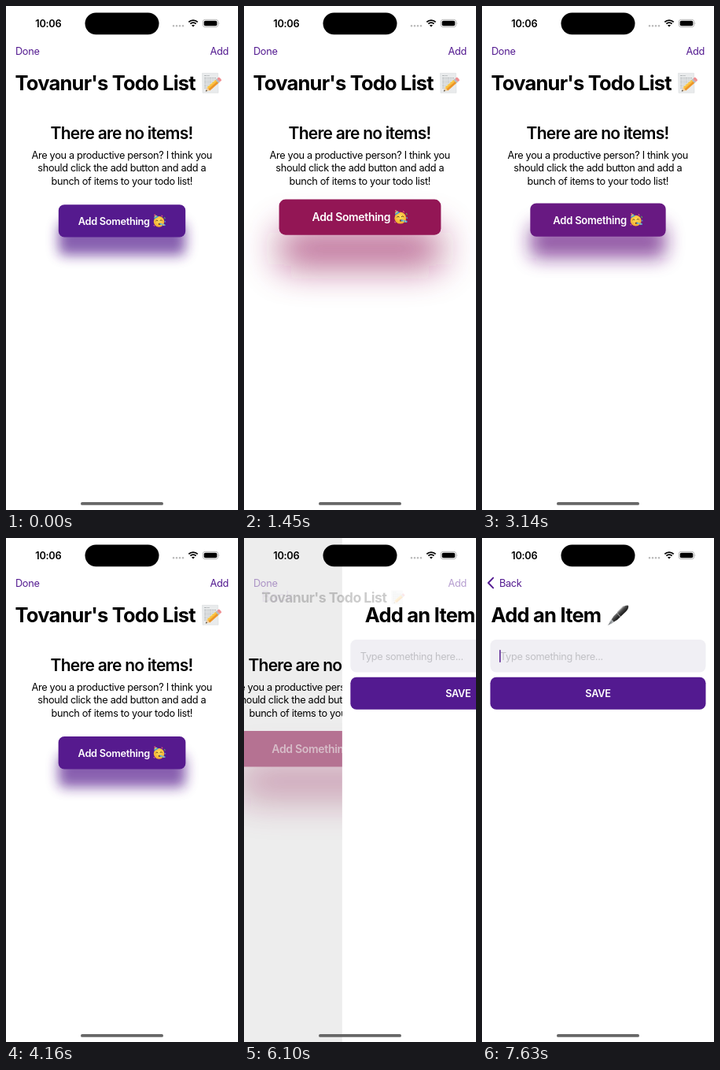
These frames come from a looping animation (295x640 px, 8 s). An HTML page:

```html
<!DOCTYPE html>
<html lang="en">
<head>
<meta charset="utf-8">
<title>Todo list</title>
<style>
  html, body { margin: 0; width: 100%; height: 100%; overflow: hidden; background: #fff; }
  svg { display: block; width: 100%; height: 100%; }
  text { font: 400 12.75px Inter, "Open Sans", sans-serif; letter-spacing: -.026em; white-space: pre; }
  .large { font-size: 25.5px; font-weight: 700; letter-spacing: -.031em; }
  .heading { font-size: 21px; font-weight: 600; letter-spacing: -.037em; }
  .strong { font-weight: 600; letter-spacing: -.022em; }
  .mid { text-anchor: middle; }
  .tint { fill: #531a90; }
</style>
</head>
<body>
<svg viewBox="0 0 295 640" xmlns="http://www.w3.org/2000/svg">
  <defs>
    <filter id="blur" filterUnits="userSpaceOnUse" x="-220" y="-120" width="440" height="320">
      <feGaussianBlur id="blurAmount" stdDeviation="7.5"/>
    </filter>
    <linearGradient id="pencilBody" x1="0" y1="0" x2="0" y2="1">
      <stop offset="0" stop-color="#ffd34d"/>
      <stop offset="1" stop-color="#ee8f22"/>
    </linearGradient>
    <radialGradient id="skin" cx=".5" cy=".4" r=".65">
      <stop offset="0" stop-color="#ffe25a"/>
      <stop offset="1" stop-color="#f2a42c"/>
    </radialGradient>
    <linearGradient id="penBody" x1="0" y1="0" x2="0" y2="1">
      <stop offset="0" stop-color="#777"/>
      <stop offset=".45" stop-color="#3d3d3d"/>
      <stop offset="1" stop-color="#161616"/>
    </linearGradient>

    <!-- memo: sheet with writing and a pencil -->
    <g id="memo">
      <path d="M1.5 .8H21.5L22 25.8H2Z" fill="#e9ebec" stroke="#d3d6d8" stroke-width=".5"/>
      <g stroke="#a3a7aa" stroke-width=".8" stroke-dasharray="3.2 .7 1.8 .6">
        <path d="M4 4H11M4 7H19M4 9.5H18M4 12H16M4 14.5H14M4 17H12M4 19.5H10"/>
      </g>
      <g transform="translate(5.8 24) rotate(-41)">
        <path d="M0 0L5-2.7V2.7Z" fill="#f2cfa0"/>
        <path d="M0 0L2-1.1V1.1Z" fill="#444"/>
        <rect x="4.8" y="-2.8" width="14.7" height="5.6" fill="url(#pencilBody)"/>
        <path d="M5 1H19.5" stroke="#d9791b" stroke-width=".6"/>
        <rect x="19.2" y="-2.9" width="2.5" height="5.8" fill="#b8bdc1"/>
        <rect x="21.5" y="-2.8" width="3.6" height="5.6" rx="1.6" fill="#ee8e91"/>
      </g>
    </g>

    <!-- party face, centred on its own origin -->
    <g id="party">
      <circle cx="-.6" cy="1" r="6.8" fill="url(#skin)"/>
      <path d="M-6.9-2.2L-5.7-7.8L-1-5.3Z" fill="#3e9bdc"/>
      <path d="M-6.6-4.5L-3.6-6.7" stroke="#f4d548" stroke-width="1.1"/>
      <circle cx="-5.9" cy="-7.3" r="1" fill="#ef5a72"/>
      <g fill="none" stroke="#60401a" stroke-width=".9" stroke-linecap="round">
        <path d="M-4.5-.1Q-3.3-1.7-2-.2M.7-.5Q2-2 3.2-.5"/>
      </g>
      <path d="M-1.4 3.2Q1 2.4 1.8 3.9Q1 5.5-1 5.2Z" fill="#7b3b1c"/>
      <path d="M1 3.9L6.6 5.3" stroke="#4aa4e3" stroke-width="1.9" stroke-linecap="round"/>
      <path d="M2.6 4.3L3.4 4.5M5 4.9L5.8 5.1" stroke="#f5dc5c" stroke-width="1.9"/>
      <g stroke-width="1.1" stroke-linecap="round">
        <path d="M2.8-6.8L3.7-5.9" stroke="#eb5777"/>
        <path d="M6.3-4.2L7-3" stroke="#55b85b"/>
        <path d="M6.8 .5L7.5 1.2" stroke="#4a9fe0"/>
        <path d="M-7.2 5.6L-6.5 6.3" stroke="#e05a9b"/>
      </g>
    </g>

    <!-- fountain pen -->
    <g id="pen" transform="translate(1 26) rotate(-44)">
      <path d="M0 0Q4-2.4 8.5-2.3V2.3Q4 2.4 0 0Z" fill="#a9adb0"/>
      <path d="M0 0H6" stroke="#55585a" stroke-width=".6"/>
      <path d="M8-2.2L13-3.3H29Q34-2.9 35.5 0Q34 2.9 29 3.3H13L8 2.2Z" fill="url(#penBody)"/>
      <path d="M18.5-3.3V3.3" stroke="#aaa" stroke-width="1"/>
      <path d="M20-3.4H31" stroke="#999" stroke-width="1.1"/>
    </g>
  </defs>

  <rect width="295" height="640" fill="#fff"/>

  <g id="list">
    <text class="heading mid" x="147" y="169">There are no items!</text>
    <text class="mid" x="147.3" y="193.7">Are you a productive person? I think you</text>
    <text class="mid" x="147.3" y="210.3">should click the add button and add a</text>
    <text class="mid" x="147.3" y="226.9">bunch of items to your todo list!</text>
    <g id="button">
      <rect id="glow" height="41.3" rx="7.5" opacity=".7" filter="url(#blur)"/>
      <rect id="face" y="-20.65" height="41.3" rx="7.5"/>
      <g id="label">
        <text class="strong" x="-55.7" y="4.8" fill="#fff">Add Something</text>
        <use href="#party" x="47.5"/>
      </g>
    </g>
  </g>
  <rect id="dim" width="295" height="640" fill="#000" opacity="0"/>

  <g id="page">
    <rect width="295" height="640" fill="#fff"/>
    <rect x="10.5" y="129" width="274" height="41.5" rx="7.5" fill="#f0eff4"/>
    <text x="23" y="154.8" fill="#c0c0c5">Type something here...</text>
    <rect id="caret" x="22.2" y="142" width="1.5" height="16" rx=".7" class="tint"/>
    <rect x="10.5" y="176.7" width="274" height="41" rx="7.5" class="tint"/>
    <text class="strong mid" x="147.5" y="201.8" fill="#fff">SAVE</text>
  </g>

  <g id="listBar">
    <text class="tint" x="12" y="61.8">Done</text>
    <text class="tint" x="283" y="61.8" text-anchor="end">Add</text>
  </g>
  <g id="listTitle">
    <text class="large" x="-.4" y="9">Tovanur's Todo List</text>
    <use href="#memo" x="236" y="-13.5"/>
  </g>
  <g id="pageTitle">
    <text class="large" x="11.6" y="107">Add an Item</text>
    <use href="#pen" x="159.5" y="84.5"/>
  </g>
  <text id="back" class="tint" x="0" y="4.6">Back</text>
  <path id="chevron" d="M14.2 50.6L8 57L14.2 63.4" fill="none" stroke="#531a90" stroke-width="1.9" stroke-linecap="round" stroke-linejoin="round"/>

  <!-- status bar and home indicator -->
  <text class="strong mid" x="53.8" y="26.7">10:06</text>
  <rect x="100.5" y="8.4" width="94" height="27.8" rx="13.9"/>
  <path d="M213 25.3H226" stroke="#b9b9b9" stroke-width="2.6" stroke-linecap="round" stroke-dasharray="0 4"/>
  <g fill="none" stroke="#000" stroke-width="1.8">
    <path d="M232.3 20.4A8.1 8.1 0 0 1 243.7 20.4M234.4 22.7A5.1 5.1 0 0 1 241.6 22.7"/>
  </g>
  <path d="M238 26.6L236 24.5Q238 22.9 240 24.5Z"/>
  <rect x="250.3" y="17.3" width="19.4" height="9.4" rx="2.9" fill="none" stroke="#a5a5a5" stroke-width=".8"/>
  <rect x="251.7" y="18.7" width="16.6" height="6.6" rx="1.8"/>
  <path d="M270.7 20.5Q272.2 22 270.7 23.5Z" fill="#a5a5a5"/>
  <rect x="95" y="630" width="105" height="3.8" rx="1.9" fill="#666"/>
</svg>
<script>
const LOOP = 8000, HALF = 2065, PULSE_START = -255;
const PUSH = 5985, PRESS = 5980, CARET = 7490;
const COOL = [82, 26, 144], WARM = [150, 22, 80];

const el = Object.fromEntries([...document.querySelectorAll('[id]')].map(n => [n.id, n]));
const clamp = v => Math.min(1, Math.max(0, v));
const lerp = (a, b, k) => a + (b - a) * k;

function set(node, attrs) {
  for (const key in attrs) node.setAttribute(key, attrs[key]);
}

// cubic-bezier(.42, 0, .58, 1)
function easeInOut(x) {
  let lo = 0, hi = 1;
  for (let i = 0; i < 24; i++) {
    const s = (lo + hi) / 2, r = 1 - s;
    const bx = 3 * r * r * s * .42 + 3 * r * s * s * .58 + s * s * s;
    if (bx < x) lo = s; else hi = s;
  }
  return lo * lo * (3 - 2 * lo);
}

// critically damped spring
function spring(ms) {
  const u = Math.max(0, ms) * .0167;
  return u > 12 ? 1 : 1 - Math.exp(-u) * (1 + u);
}

function mix(k) {
  const part = COOL.map((c, i) => Math.round(Math.sqrt(lerp(c * c, WARM[i] * WARM[i], k))));
  return `rgb(${part})`;
}

function drawButton(t) {
  const phase = ((t - PULSE_START) / HALF) % 2;
  const k = easeInOut(phase < 1 ? phase : 2 - phase);
  const width = lerp(160, 190, k), fill = mix(k), pressed = t >= PRESS;
  set(el.button, {
    transform: `translate(147.5 ${273 - 5.25 * k}) scale(${1 + .1 * k})`,
    opacity: pressed ? .56 : 1
  });
  set(el.face, { x: -width / 2, width, fill });
  set(el.glow, { x: -width / 2, y: -20.65 + lerp(22.5, 37.5, k), width, fill });
  set(el.blurAmount, { stdDeviation: lerp(7.5, 22.5, k) });
  set(el.label, { opacity: pressed ? .6 : 1 });
}

function drawPush(t) {
  const p = spring(t - PUSH), rest = 1 - p;
  const x = 12 + Math.min(10, 19 * p), y = lerp(98, 57, p);
  set(el.list, { transform: `translate(${-88.5 * p} 0)` });
  set(el.dim, { opacity: .12 * p });
  set(el.page, { transform: `translate(${295 * rest} 0)` });
  set(el.listBar, { opacity: rest });
  set(el.listTitle, {
    transform: `translate(${x + p} ${y + 2 * p}) scale(${1 - .53 * p})`,
    opacity: Math.min(1, rest * rest * 1.1)
  });
  set(el.pageTitle, { transform: `translate(${336 * rest} 0)` });
  set(el.back, {
    transform: `translate(${x} ${y}) scale(${lerp(2, 1, p)})`,
    opacity: clamp((p - .55) / .45)
  });
  set(el.chevron, { opacity: clamp((p - .6) / .4) });
  set(el.caret, { opacity: clamp((t - CARET) / 110) });
}

function render(now) {
  const t = now % LOOP;
  drawButton(t);
  drawPush(t);
}

const start = performance.now();
function tick() {
  render(performance.now() - start);
  requestAnimationFrame(tick);
}
tick();
</script>
</body>
</html>
```
